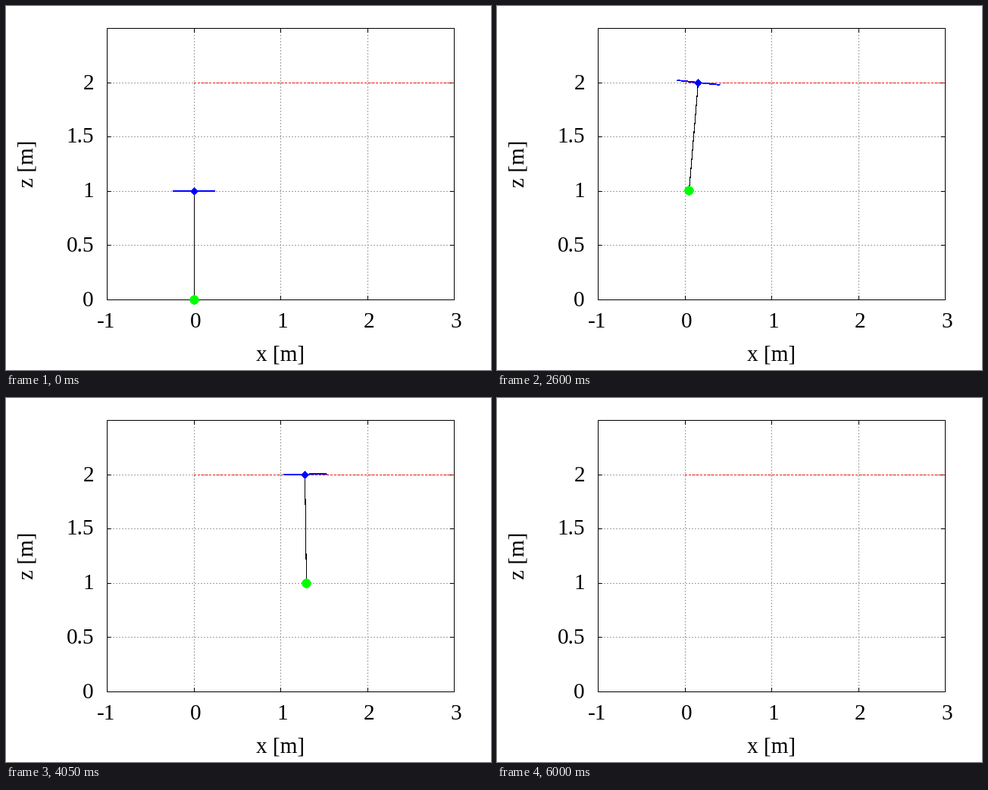
Write a matplotlib script that moves like this. It is 640x480 px and loops after 8000 ms.

```python
import numpy as np
import matplotlib.pyplot as plt
from matplotlib.animation import FuncAnimation
from matplotlib.patches import Circle, Polygon, Rectangle

WIDTH, HEIGHT, DPI = 640, 480, 100
PT = 72 / DPI                      # points per pixel
FRAMES, INTERVAL = 160, 50
LEFT, RIGHT, TOP, BOTTOM = 133, 591, 29, 387
BLUE, GREEN, RED, GRAY = "#0000ff", "#00ff00", "#ff0000", "#a0a0a0"

GRAVITY = 9.81
ROPE = 1.0
HALF_BAR = 0.24
LIFT_RATE, LIFT_END = 12.0, 0.65
CRUISE_START, HOLD_UNTIL = 2.05, 2.10
LAG = 0.70                         # distance lost to the speed-up, at 1 m/s
OMEGA = 2 / LAG
DRONE_SHARE = 0.27                 # drone mass / total mass


def px(x):
    """Centre of the pixel column at x metres."""
    return np.floor(LEFT + (x + 1) * (RIGHT - LEFT) / 4 + 0.5) + 0.5


def py(z):
    """Centre of the pixel row at z metres."""
    return np.floor(BOTTOM - z * (BOTTOM - TOP) / 2.5 + 0.5) + 0.5


def lift(t):
    """Height gained by a critically damped climb of one metre."""
    if t >= LIFT_END:
        return 1.0
    return 1 - (1 + LIFT_RATE * t) * np.exp(-LIFT_RATE * t)


def cruise(tau):
    """Load position, acceleration and its second derivative
    for a third-order Butterworth response to a 1 m/s command."""
    sigma, wd = OMEGA / 2, OMEGA * np.sqrt(3) / 2

    def mode(phase):
        swing = np.cos(wd * tau + phase)
        return np.exp(-OMEGA * tau) - 2 / np.sqrt(3) * np.exp(-sigma * tau) * swing

    x = tau - LAG + mode(5 * np.pi / 6) / OMEGA
    acc = OMEGA * mode(np.pi / 6)
    snap = OMEGA ** 3 * mode(-np.pi / 2)
    return x, acc, snap


def pose(t):
    """Drone position, load position and bar slope at time t in seconds."""
    if t < CRUISE_START - 1e-6:
        z = lift(t)
        return (0, z + ROPE), (0, z), 0
    tau = t - CRUISE_START if t > HOLD_UNTIL + 1e-6 else 0
    x, acc, snap = cruise(tau)
    offset = ROPE * acc / GRAVITY
    slope = (acc + DRONE_SHARE * snap / GRAVITY) / GRAVITY
    return (x + offset, 2), (x, 2 - np.sqrt(ROPE ** 2 - offset ** 2)), slope


fig = plt.figure(figsize=(WIDTH / DPI, HEIGHT / DPI), dpi=DPI, facecolor="white")
ax = fig.add_axes([0, 0, 1, 1])
ax.set_xlim(0, WIDTH)
ax.set_ylim(HEIGHT, 0)
ax.axis("off")


def stroke(xs, ys, color="black", width=1, cap="projecting", **style):
    return ax.plot(xs, ys, color=color, lw=width * PT, snap=False,
                   solid_capstyle=cap, dash_capstyle="butt", **style)[0]


def label(x, y, text, ha="center", **style):
    ax.text(x, y, text, ha=ha, va="baseline", family="Liberation Serif",
            size=29.3 * PT, color="black", **style)


x0, x1, y0, y1 = LEFT + 0.5, RIGHT + 0.5, TOP + 0.5, BOTTOM + 0.5
TICK = 5
grid = dict(color=GRAY, dashes=(2, 2), zorder=1)

for x in range(-1, 4):
    c = px(x)
    if -1 < x < 3:
        stroke([c, c], [BOTTOM + 1, TOP], **grid)
    stroke([c, c], [y1, y1 - TICK], zorder=2)
    stroke([c, c], [y0, y0 + TICK], zorder=2)
    label(c + (-1 if x < 0 else 2), 424, str(x))

for z in (0, 0.5, 1, 1.5, 2):
    c = py(z)
    if z:
        stroke([LEFT, RIGHT + 1], [c, c], **grid)
    stroke([x0, x0 + TICK], [c, c], zorder=2)
    stroke([x1, x1 - TICK], [c, c], zorder=2)
    label(116, c + 8, f"{z:g}", ha="right")

stroke([px(0) - 0.5, RIGHT + 1], [py(2)] * 2, RED, dashes=(3, 2), zorder=2)
stroke([x0, x1, x1, x0, x0], [y0, y0, y1, y1, y0], zorder=2)
label(362, 467, "x [m]")
label(36, 208, "z [m]", rotation=90, rotation_mode="anchor")

# Without antialiasing every touched pixel is filled, so the moving
# lines are set thinner than they appear.
plot_area = Rectangle((LEFT, TOP), RIGHT - LEFT + 1, BOTTOM - TOP + 1,
                      transform=ax.transData)
rope = stroke([], [], width=0.1, antialiased=False, zorder=3)
bar = stroke([], [], BLUE, width=0.8, cap="butt", antialiased=False, zorder=4)
for line in (rope, bar):
    line.set_clip_path(plot_area)
hub = ax.add_patch(Polygon(np.zeros((4, 2)), color=BLUE, lw=0,
                           antialiased=False, snap=False, zorder=5))
load = ax.add_patch(Circle((0, 0), 5.7, color=GREEN, lw=0,
                           antialiased=False, snap=False, zorder=6))
DIAMOND = 4.6 * np.array([[0, -1], [1, 0], [0, 1], [-1, 0]])


def draw(frame):
    (xd, zd), (xl, zl), slope = pose(frame * INTERVAL / 1000)
    drone_at = np.array([px(xd), py(zd)])
    load_at = np.array([px(xl), py(zl)])
    rope.set_data(*zip(drone_at, load_at))
    rise = HALF_BAR * slope
    bar.set_data([px(xd - HALF_BAR) - 0.5, px(xd + HALF_BAR) + 0.5],
                 [py(zd + rise) - 0.5, py(zd - rise) - 0.5])
    hub.set_xy(drone_at + DIAMOND)
    hub.set_visible(xd <= 3.005)
    load.center = load_at
    load.set_visible(xl <= 3.005)
    return rope, bar, hub, load


anim = FuncAnimation(fig, draw, frames=FRAMES, interval=INTERVAL,
                     repeat=True, repeat_delay=0)
plt.show()
```
